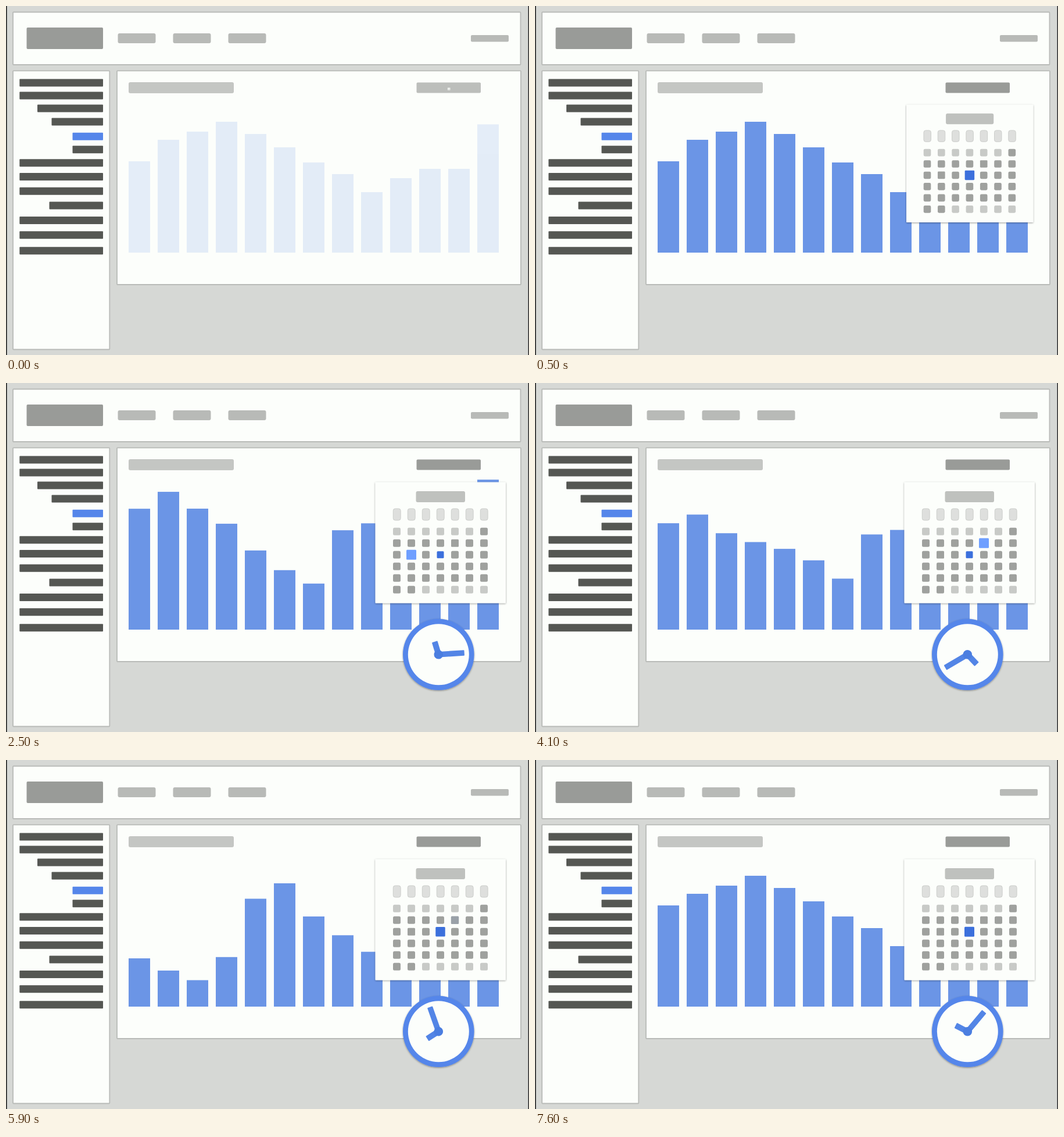
These frames come from a looping animation (900x600 px, 8 s). An HTML page:

```html
<!DOCTYPE html>
<html lang="en">
<head>
<meta charset="utf-8">
<title>Dashboard with calendar and clock</title>
<style>
  html, body { margin: 0; width: 100%; height: 100%; overflow: hidden; background: #d6d8d5; }
  svg { display: block; width: 100%; height: 100%; }
</style>
</head>
<body>
<svg id="stage" viewBox="0 0 900 600">
  <defs>
    <filter id="shadow" x="-10%" y="-10%" width="120%" height="120%">
      <feDropShadow dx="0" dy="1" stdDeviation="1.6" flood-color="#000" flood-opacity=".4"/>
    </filter>
  </defs>
</svg>
<script>
const LOOP = 8000, STEP = 100, BASE = 424;
const WHITE = '#fcfefb', BLUE = '#5586ea', DARK = [159, 161, 158];
const stage = document.getElementById('stage');

function add(parent, tag, attrs) {
  const el = document.createElementNS('http://www.w3.org/2000/svg', tag);
  set(el, attrs);
  parent.appendChild(el);
  return el;
}
function set(el, attrs) {
  for (const key in attrs) el.setAttribute(key, attrs[key]);
}
function box(parent, x, y, width, height, fill, rx = 0) {
  return add(parent, 'rect', { x, y, width, height, fill, rx });
}
function panel(x, y, w, h) {
  set(box(stage, x, y, w, h, WHITE, 1), { stroke: '#b9bbb8', 'stroke-width': 1.8 });
}

const clamp = v => Math.max(0, Math.min(1, v));
const ramp = (t, start, length) => clamp((t - start) / length);
const smooth = p => p * p * (3 - 2 * p);
const easeOut = p => 1 - (1 - p) * (1 - p);
const mix = (a, b, p) => a + (b - a) * p;
const mixColor = (a, b, p) => `rgb(${a.map((v, i) => Math.round(mix(v, b[i], p)))})`;

// Page layout
box(stage, 0, 0, 900, 600, '#d6d8d5');
box(stage, 0, 0, 1.6, 600, '#222');
box(stage, 898.6, 0, 1.4, 600, '#222');
panel(12, 10.5, 873.5, 90.5);
panel(12, 111.3, 166.3, 479.2);
panel(191, 111.3, 695, 367.7);
box(stage, 35.5, 37, 131.5, 37, '#999b98', 2);
for (const x of [192.5, 287.5, 382.5]) box(stage, x, 47, 65, 17, '#b8bab7', 3);
box(stage, 800, 50, 65, 11.5, '#b8bab7', 2);
box(stage, 211, 131, 181, 19, '#c4c6c3', 3);
const button = box(stage, 706.5, 131.5, 110.5, 18, '#999b98', 2);

const menuY = [125.5, 147.5, 169.5, 192.5, 217.8, 240.2, 263.2, 287, 311.8, 336.5, 362, 387.3, 414.3];
const indents = { 2: 54, 3: 78.5, 4: 114.5, 5: 114.5, 9: 74.5 };
menuY.forEach((y, i) => {
  const x = indents[i] || 23.3;
  box(stage, x, y, 167 - x, 13, i === 4 ? BLUE : '#555753', 1);
});

// Chart: bar tops for each selected day
const today = [267, 230, 216, 199, 220, 243, 269, 289, 320, 296, 280, 280, 203.5];
const earlier = [206, 178.5, 216, 250.5, 301.5, 337.5, 360, 246, 225.5, 215, 205, 190, 158.7];
const other = [341, 362, 378.5, 338.8, 238.5, 212, 269, 301.3, 329.7, 320, 300, 290, 280];
const todayAgain = [250, ...today.slice(1)];
const barChanges = [[1750, earlier], [3866, other], [5982, todayAgain]];
const chart = add(stage, 'g', {});
const bars = today.map((top, i) => box(chart, 211 + 50 * i, top, 37, BASE - top, '#6b95e6'));

// Calendar
const calendar = add(stage, 'g', {});
set(box(calendar, 635.5, 170.5, 224.5, 208, WHITE, 1), { filter: 'url(#shadow)' });
box(calendar, 705.5, 186, 84.5, 19, '#bfc1be', 3);
for (let col = 0; col < 7; col++) {
  set(box(calendar, 666.3 + 25 * col, 216, 12.8, 20, '#dedfdd', 3.5), { stroke: '#cbcdca' });
}
const cells = [];
for (let row = 0; row < 6; row++) {
  for (let col = 0; col < 7; col++) {
    const faint = (row === 0 && col < 6) || (row === 5 && col > 1);
    cells.push(box(calendar, 666 + 25 * col, 248.8 + 20 * row, 13, 13, faint ? '#c8cac7' : `rgb(${DARK})`, 2.5));
  }
}
function drawCell(row, col, size, fill) {
  set(cells[row * 7 + col], {
    x: 672.5 + 25 * col - size / 2, y: 295.2 + 20 * (row - 2) - size / 2,
    width: size, height: size, fill, rx: 1.5
  });
}
function drawPick(row, col, p) {
  drawCell(row, col, mix(13, 17, p), mixColor(DARK, [111, 159, 255], p));
}

// Clock
const clock = add(stage, 'g', {});
add(clock, 'circle', { r: 61.3, fill: BLUE, filter: 'url(#shadow)' });
add(clock, 'circle', { r: 52.5, fill: WHITE });
const hands = add(clock, 'g', {});
const hand = (length, width, angle) =>
  box(hands, -width / 2, -length, width, length, '#5385e6', 1)
    .setAttribute('transform', `rotate(${angle})`);
hand(23, 10, 297);
hand(44.5, 9.5, 40);
add(hands, 'circle', { r: 7.8, fill: '#4b7ee0' });

function draw(t) {
  const fade = ramp(t, -70, 470);
  chart.setAttribute('opacity', mix(0.02, 1, fade));
  button.setAttribute('fill', mixColor([194, 196, 193], [153, 155, 152], fade));

  let tops = today;
  for (const [start, next] of barChanges) {
    const p = ramp(t, start, 900);
    tops = tops.map((top, i) => mix(top, next[i], p));
  }
  bars.forEach((bar, i) => set(bar, { y: tops[i], height: BASE - tops[i] }));

  const open = Math.max(0.02, easeOut(ramp(t, 0, 600)));
  calendar.setAttribute('transform', `translate(762.5 140) scale(${open}) translate(-762.5 -140)`);

  const first = smooth(ramp(t, 1220, 280));
  const second = smooth(ramp(t, 3220, 280));
  const back = smooth(ramp(t, 5660, 300));
  drawPick(2, 1, first - second);
  drawPick(1, 4, second - back);
  drawCell(2, 3, mix(17, 12, first - back), '#3c70dc');

  const pop = easeOut(ramp(t, 500, 600));
  set(clock, { transform: `translate(744.3 466.8) scale(${pop})`, visibility: pop ? 'visible' : 'hidden' });
  const turns = [1739, 3825, 5741].reduce((sum, start) => sum + 2 * smooth(ramp(t, start, 900)), 0);
  hands.setAttribute('transform', `rotate(${-360 * turns})`);
}

const began = performance.now();
function tick() {
  const t = (performance.now() - began) % LOOP;
  draw(Math.floor(t / STEP) * STEP);
  requestAnimationFrame(tick);
}
draw(0);
requestAnimationFrame(tick);
</script>
</body>
</html>
```
